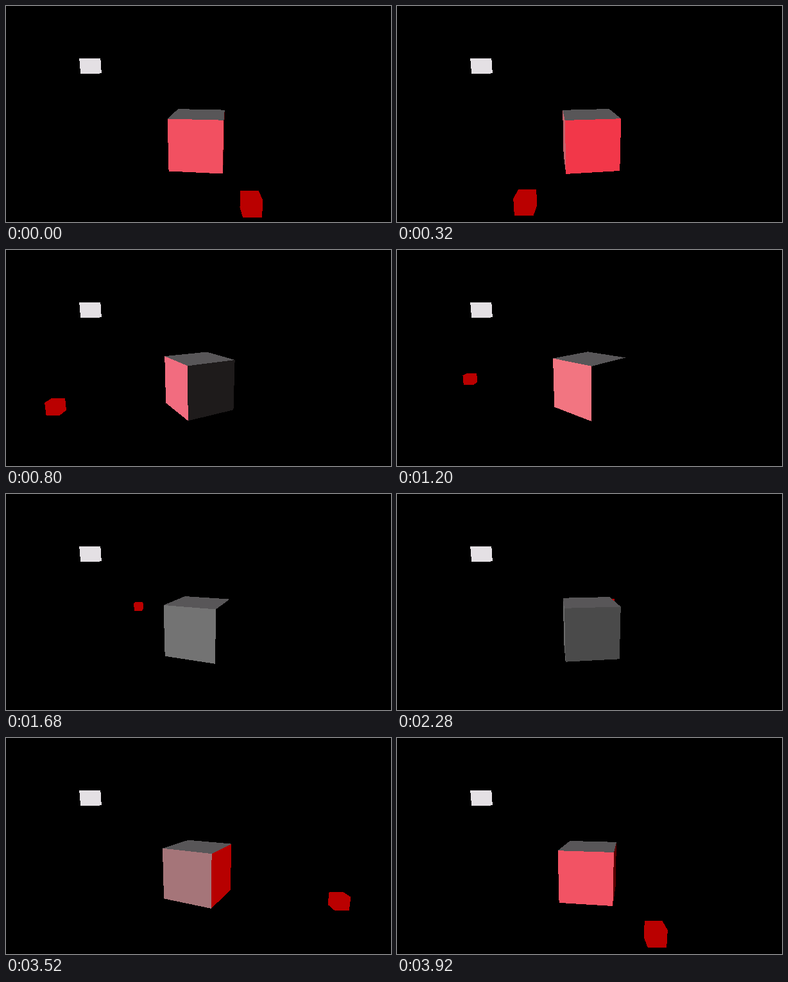
These frames come from a looping animation (600x338 px, 3960 ms). An HTML page:

```html
<!DOCTYPE html>
<html lang="en">
<head>
<meta charset="utf-8">
<title>Cube with an orbiting light</title>
<style>
  html, body { margin: 0; width: 100%; height: 100%; overflow: hidden; background: #000; }
  svg { display: block; width: 600px; height: 338px; shape-rendering: crispEdges; }
</style>
</head>
<body>
<svg viewBox="0 0 600 338">
  <rect width="600" height="338" fill="#000"/>
  <path d="M114.2 82H147.3L148.8 104.8L143 106.4H116.2Z" fill="#e4e0e4"/>
  <g id="scene"></g>
</svg>
<script>
const STEP = 40, FRAMES = 99;
const RAD = Math.PI / 180;
const FOCAL = 169 / Math.tan(22.5 * RAD);
// camera at (0, 1, 5), looking at the origin
const DIST = Math.hypot(1, 5), SIN = 1 / DIST, COS = 5 / DIST;
const LIGHT_RED = 'rgb(186,0,0)', TOP_GRAY = 'rgb(88,86,88)';
const WHITE_DIR = -48;

const scene = document.getElementById('scene');
const newPath = () =>
  scene.appendChild(document.createElementNS('http://www.w3.org/2000/svg', 'path'));
const cubePaths = Array.from({ length: 5 }, newPath);
const lightPath = newPath();

function project([x, y, z]) {
  const depth = DIST - y * SIN - z * COS;
  const up = y * COS - z * SIN;
  return [300 + FOCAL * x / depth, 169 - FOCAL * up / depth];
}

// outline of a face, empty when it points away from the camera
function facePath(corners) {
  const pts = corners.map(project);
  let area = 0;
  pts.forEach(([x, y], i) => {
    const [nx, ny] = pts[(i + 1) % pts.length];
    area += x * ny - nx * y;
  });
  if (area <= 0) return '';
  return 'M' + pts.map(p => p.map(v => v.toFixed(2)).join(' ')).join('L') + 'Z';
}

// four sides, turned by yaw degrees, then the top
function cubeFaces(cx, cy, cz, size, yaw) {
  const r = size * Math.SQRT1_2, h = size / 2;
  const corner = (deg, y) =>
    [cx + r * Math.sin(deg * RAD), cy + y, cz + r * Math.cos(deg * RAD)];
  const faces = [0, 90, 180, 270].map(k => {
    const left = yaw + k - 45, right = yaw + k + 45;
    return [corner(left, h), corner(right, h), corner(right, -h), corner(left, -h)];
  });
  faces.push([45, 135, 225, 315].map(k => corner(yaw + k, h)).reverse());
  return faces.map(facePath);
}

const facing = deg => Math.max(0, Math.cos(deg * RAD));

function sideColor(normal, lightDir) {
  const white = 130 * facing(normal - WHITE_DIR);
  const red = 186 * Math.pow(facing(normal - lightDir), 0.85);
  const rgb = [Math.min(242, white + red), Math.max(0, white - red * 0.1), white];
  return `rgb(${rgb.map(Math.round)})`;
}

function render(ms) {
  const turn = Math.floor(ms / STEP) % FRAMES / FRAMES;
  const orbit = 13 - 360 * turn;
  const yaw = -6.5 + 180 * turn;

  cubeFaces(0, -0.5, 0, 1, yaw).forEach((d, i) => {
    cubePaths[i].setAttribute('d', d);
    cubePaths[i].setAttribute('fill', i < 4 ? sideColor(yaw + 90 * i, orbit) : TOP_GRAY);
  });

  const x = 2.5 * Math.sin(orbit * RAD), z = 2.5 * Math.cos(orbit * RAD);
  lightPath.setAttribute('d', cubeFaces(x, -0.5, z, 0.2, 0).join(''));
  lightPath.setAttribute('fill', LIGHT_RED);
  scene.insertBefore(lightPath, z < 0 ? cubePaths[0] : null);
}

let start = null;
function tick(now) {
  if (start === null) start = now;
  render(Math.max(0, now - start));
  requestAnimationFrame(tick);
}
render(0);
requestAnimationFrame(tick);
</script>
</body>
</html>
```
